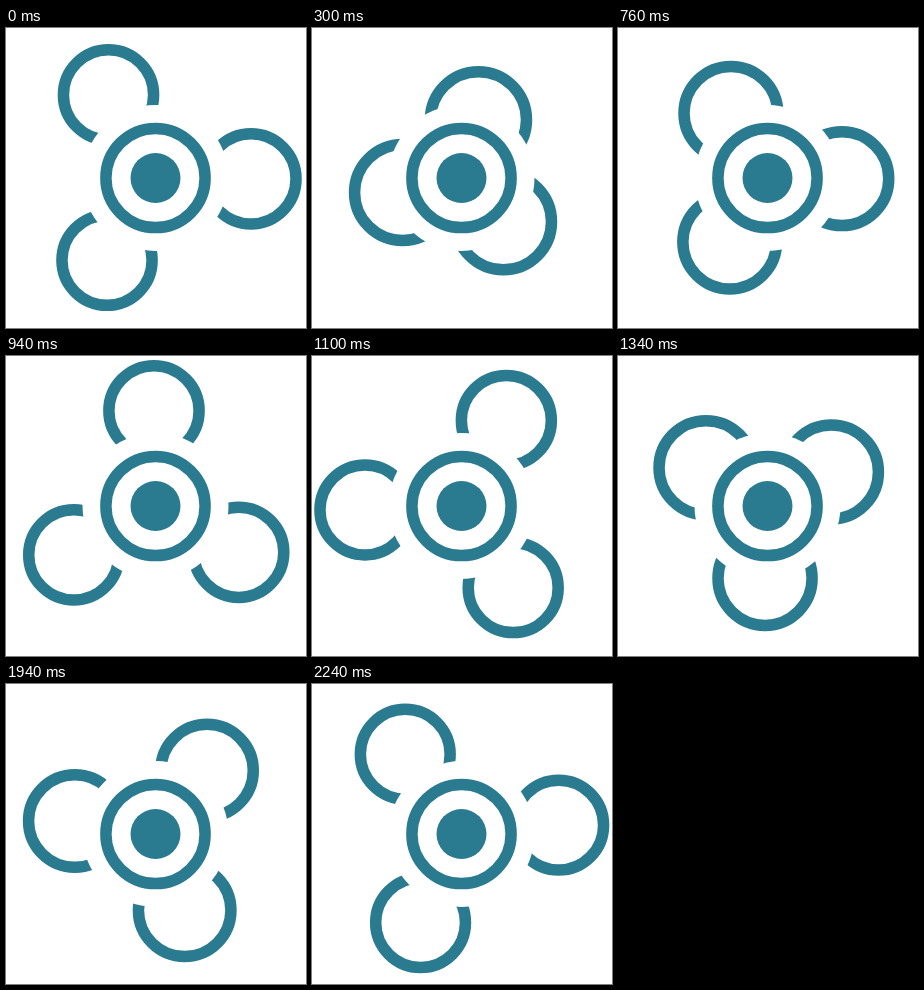
These frames come from a looping animation (300 by 300 pixels, 2.26 s). An HTML page:

```html
<!DOCTYPE html>
<html lang="en">
<head>
<meta charset="utf-8">
<title>Orbiting rings</title>
<style>
  html, body { margin: 0; width: 100%; height: 100%; overflow: hidden; background: #fff; }
  svg { display: block; width: 100%; height: 100%; }
</style>
</head>
<body>
<svg viewBox="0 0 300 300">
  <g transform="translate(149.5 150)" fill="none" stroke="#2a7a90" stroke-width="11.5">
    <g id="orbit">
      <circle/><circle/><circle/>
    </g>
    <circle r="73" fill="#fff" stroke="none"/>
    <circle r="49.6"/>
    <circle r="25" fill="#2a7a90" stroke="none"/>
  </g>
</svg>
<script>
const LOOP = 2260;
const STEPS = 63;
const STROKE = 11.5;
const TAU = Math.PI * 2;
const rings = document.querySelectorAll('#orbit circle');

function draw(ms) {
  // the motion advances in whole steps
  const step = Math.floor((ms % LOOP) / LOOP * STEPS + 0.35);
  const turn = TAU * step / STEPS + 0.009;
  // two in-and-out swings per revolution
  const dist = 74 + 25 * Math.cos(2 * TAU * (step + 2.7) / STEPS);
  // rings grow a little as they come closer
  const outer = 50.7 + (97 - dist) * 0.085;
  rings.forEach((ring, i) => {
    const a = turn + i * TAU / 3;
    ring.setAttribute('cx', dist * Math.cos(a));
    ring.setAttribute('cy', dist * Math.sin(a));
    ring.setAttribute('r', outer - STROKE / 2);
  });
}

const start = performance.now();
function tick() {
  draw(performance.now() - start);
  requestAnimationFrame(tick);
}
draw(0);
requestAnimationFrame(tick);
</script>
</body>
</html>
```
